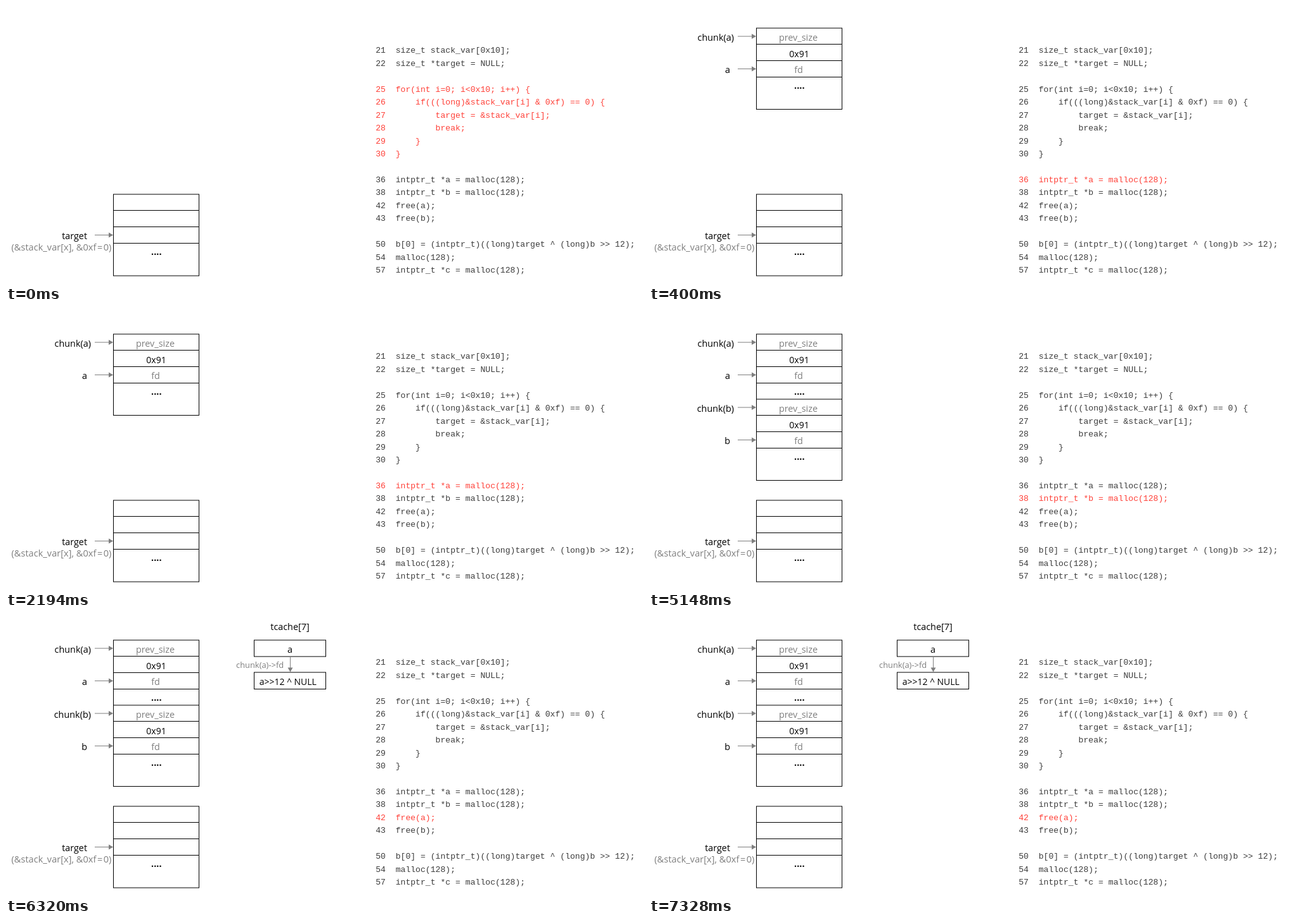
Recreate the animation shown at these times as an HTML page. Size 1005 px wide and 440 px high, loop 8000 ms.

```html
<!DOCTYPE html>
<html lang="en">
<head>
<meta charset="utf-8">
<title>Heap walkthrough</title>
<style>
html, body { margin: 0; width: 100%; height: 100%; overflow: hidden; background: #fff; }
svg { display: block; }
text { font: 14.4px "Open Sans", "Noto Sans", sans-serif; fill: #000; white-space: pre; }
.mid { text-anchor: middle; }
.end { text-anchor: end; }
.dim { fill: #7f7f7f; }
.dots { font-weight: 700; }
.code { font: 13.12px "Liberation Mono", "DejaVu Sans Mono", monospace; fill: #3c3c3c; }
.code.on { fill: #ff4038; }
.box { fill: none; stroke: #000; stroke-width: 1; }
.arrow { fill: none; stroke: #7f7f7f; stroke-width: 1; }
.head { fill: #7f7f7f; }
</style>
</head>
<body>
<svg id="stage" width="1005" height="440" viewBox="0 0 1005 440"></svg>
<script>
const LOOP = 8000;
const STEPS = [
  { at: 0, lines: [25, 26, 27, 28, 29, 30] },
  { at: 400, lines: [36] },
  { at: 3390, lines: [38] },
  { at: 6320, lines: [42] }
];
// [row, line number, code]
const CODE = [
  [0, 21, "size_t stack_var[0x10];"],
  [1, 22, "size_t *target = NULL;"],
  [3, 25, "for(int i=0; i<0x10; i++) {"],
  [4, 26, "    if(((long)&stack_var[i] & 0xf) == 0) {"],
  [5, 27, "        target = &stack_var[i];"],
  [6, 28, "        break;"],
  [7, 29, "    }"],
  [8, 30, "}"],
  [10, 36, "intptr_t *a = malloc(128);"],
  [11, 38, "intptr_t *b = malloc(128);"],
  [12, 42, "free(a);"],
  [13, 43, "free(b);"],
  [15, 50, "b[0] = (intptr_t)((long)target ^ (long)b >> 12);"],
  [16, 54, "malloc(128);"],
  [17, 57, "intptr_t *c = malloc(128);"]
];

const stage = document.getElementById("stage");

function add(parent, tag, attrs, content) {
  const el = document.createElementNS("http://www.w3.org/2000/svg", tag);
  for (const key in attrs) el.setAttribute(key, attrs[key]);
  if (content) el.textContent = content;
  return parent.appendChild(el);
}
const group = from => {
  const g = add(stage, "g", {});
  g.from = from;
  return g;
};
const label = (g, x, y, str, cls, size) => {
  const el = add(g, "text", { x, y, class: cls || "" }, str);
  if (size) el.style.fontSize = size + "px";
  return el;
};
const path = (g, d, cls) => add(g, "path", { d, class: cls });
const box = (g, x, y, width, height) => add(g, "rect", { x, y, width, height, class: "box" });
const rules = (g, ys) => path(g, ys.map(y => `M169.5 ${y}H304.5`).join(""), "box");

function pointer(g, y) {
  path(g, `M140 ${y}H163`, "arrow");
  path(g, `M162 ${y - 4}L169 ${y}L162 ${y + 4}Z`, "head");
}

function chunk(g, name, top) {
  box(g, 169.5, top, 135, 128.5);
  rules(g, [25.5, 51.5, 77.5].map(d => top + d));
  label(g, 134, top + 19.5, `chunk(${name})`, "end");
  label(g, 128, top + 70.5, name, "end");
  pointer(g, top + 13);
  pointer(g, top + 64.5);
  label(g, 235.5, top + 19.5, "prev_size", "mid dim");
  label(g, 237, top + 45.5, "0x91", "mid", 14);
  label(g, 236, top + 71, "fd", "mid dim");
  label(g, 237.3, top + 95.5, "....", "mid dots");
}

const base = group(0);
box(base, 169.5, 298, 135, 129);
rules(base, [323.5, 349.5, 375.5]);
label(base, 128, 369, "target", "end");
label(base, 8.5, 386.5, "(&stack_var[x], &0xf\u200a=\u200a0)", "dim", 14.6);
label(base, 237.3, 394, "....", "mid dots");
pointer(base, 362.5);

chunk(group(1), "a", 35);
chunk(group(2), "b", 138);

const bin = group(3);
label(bin, 448, 19.3, "tcache[7]", "mid");
box(bin, 391.5, 35, 113, 26);
box(bin, 391.5, 86, 113, 26.5);
label(bin, 448, 54.7, "a", "mid");
label(bin, 444.8, 105.5, "a>>12 ^ NULL", "mid", 14);
label(bin, 363, 78.7, "chunk(a)->fd", "dim", 12.9);
path(bin, "M448.5 61V80", "arrow");
path(bin, "M444.5 78.5L448.5 85.5L452.5 78.5Z", "head");

const lines = CODE.map(([row, num, str]) => {
  const el = label(stage, 583.2, 74.4 + row * 20.45, `${num}  ${str}`, "code");
  el.num = num;
  return el;
});
const groups = [...stage.querySelectorAll("g")];

let shown = -1;
function draw(time) {
  const t = time % LOOP;
  const step = STEPS.filter(s => s.at <= t).length - 1;
  if (step !== shown) {
    shown = step;
    groups.forEach(g => { g.style.display = g.from <= step ? "" : "none"; });
    lines.forEach(l => l.classList.toggle("on", STEPS[step].lines.includes(l.num)));
  }
}

const start = performance.now();
function tick() {
  draw(performance.now() - start);
  requestAnimationFrame(tick);
}
tick();
</script>
</body>
</html>
```
